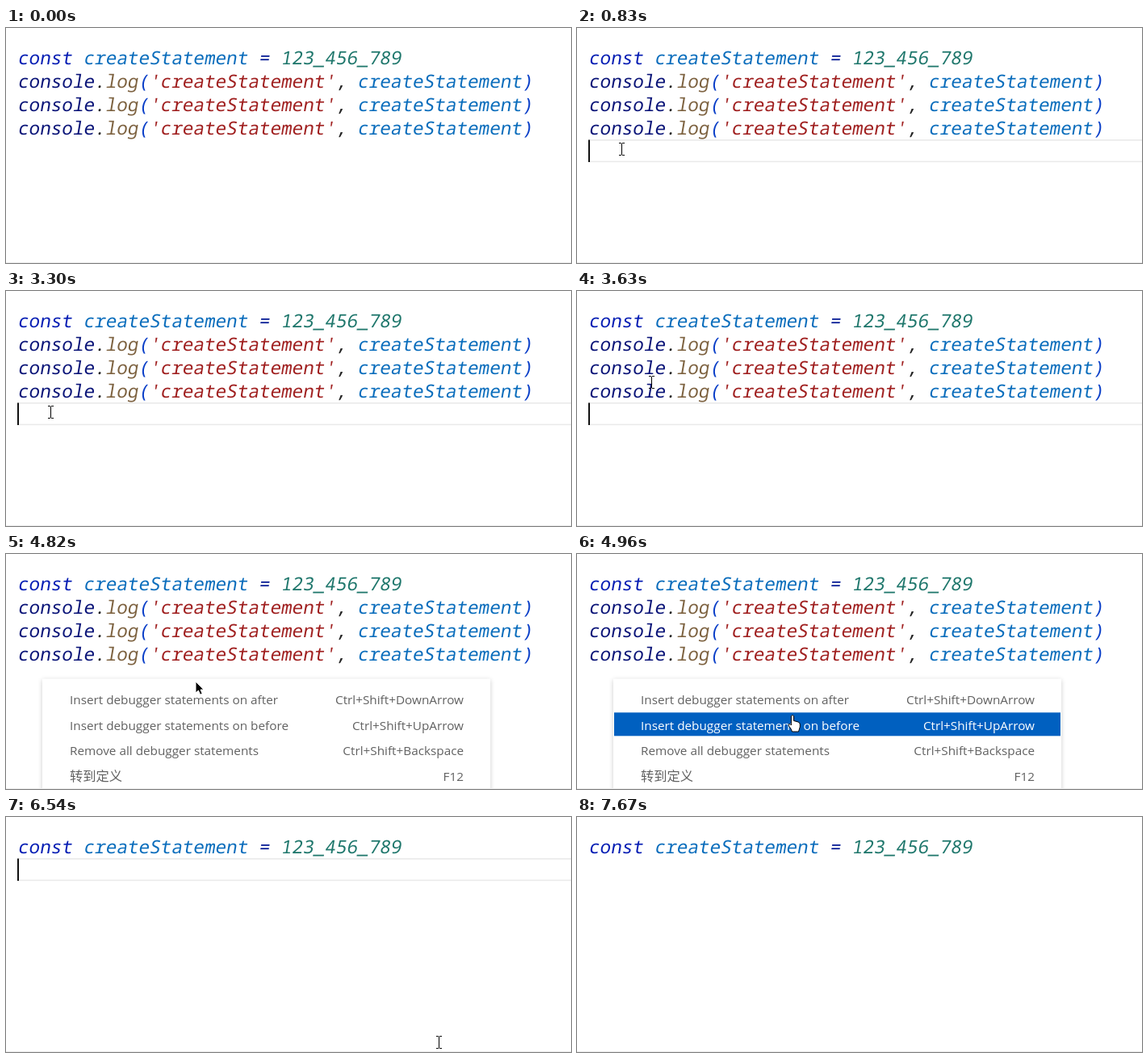
Write an HTML page with a canvas that moves like this. It is 700 px wide and 291 px high and loops after 7740 ms.

```html
<!DOCTYPE html>
<html lang="en">
<head>
<meta charset="utf-8">
<title>Debugger statements</title>
<style>
  html, body { margin: 0; width: 100%; height: 100%; overflow: hidden; background: #fff; }
  canvas { display: block; }
</style>
</head>
<body>
<canvas id="stage" width="700" height="291"></canvas>
<script>
const ctx = document.getElementById('stage').getContext('2d');
const W = 700, H = 291, LOOP = 7740, STEP = 70;
const LINE = 28.8, FIRST_BASELINE = 45.4, FIRST_TOP = 22.6, LEFT = 14;
const CODE_FONT = '300 22.65px "Noto Sans Mono", monospace';
const MENU_FONT = '15.3px "Open Sans", sans-serif';
const CJK_FONT = '16.25px "Noto Sans CJK SC", "Noto Sans CJK", sans-serif';

const DECLARATION = [
  ['const ', '#061eb4'], ['createStatement ', '#0a6dbc'],
  ['= ', '#0a1e96'], ['123_456_789', '#1f776c'],
];
const LOG = [
  ['console', '#0a1478'], ['.', '#222'], ['log', '#7d6240'], ['(', '#0a3fc8'],
  ["'createStatement'", '#a02020'], [', ', '#222'],
  ['createStatement', '#0a6dbc'], [')', '#0a3fc8'],
];
const MENU = [
  ['Insert debugger statements on after', 'Ctrl+Shift+DownArrow'],
  ['Insert debugger statements on before', 'Ctrl+Shift+UpArrow'],
  ['Remove all debugger statements', 'Ctrl+Shift+Backspace'],
  ['转到定义', 'F12', CJK_FONT],
];
const ROW_TOP = 164.7, ROW_PITCH = 31.6, ROW_HEIGHT = 29;

// Pointer route: time, x, y
const ROUTE = [
  [70, 246, 184], [140, 186, 160], [210, 105, 141], [280, 54, 137],
  [480, 54, 137], [620, 55, 150], [3350, 55, 150], [3630, 92, 113],
  [3770, 92, 113], [4050, 50, 138], [4120, 45, 152], [4400, 45, 152],
  [4820, 235, 158], [4890, 250, 180], [4960, 267, 200],
  [5380, 279, 237], [6260, 279, 237], [6680, 664, 300],
];
const CLICKS = [[620, 760], [4120, 4260], [6130, 6260]];
// The recording restarts its 70 ms rhythm at these moments
const ANCHORS = [0, 480, 1760, 3300, 3350, 6130, 6190, 7670];

const ARROW = new Path2D('M0 0V14L3.4 11 5.6 16.2 8.2 15 6 10H10Z');
const HAND = new Path2D('M-1.6 .6Q0 -1.6 1.6 .6V6.5L7 8Q9.3 8.6 9.3 11V14L7.5 20H-.5Q-1.6 16 -4.6 13Q-5.4 9.8 -3.2 10.4L-1.6 12Z');

const within = (t, [from, to]) => t >= from && t < to;

function snap(t) {
  const start = ANCHORS.filter(a => a <= t).pop();
  return start + Math.floor((t - start) / STEP) * STEP;
}

function pointerAt(t) {
  const i = ROUTE.findIndex(p => p[0] > t);
  if (i < 1) return null;
  const [a, b] = [ROUTE[i - 1], ROUTE[i]];
  const k = (t - a[0]) / (b[0] - a[0]);
  return { x: Math.round(a[1] + (b[1] - a[1]) * k), y: Math.round(a[2] + (b[2] - a[2]) * k) };
}

function rect(x, y, w, h, color) {
  ctx.fillStyle = color;
  ctx.fillRect(x, y, w, h);
}

function codeLine(tokens, row) {
  ctx.save();
  ctx.transform(1, 0, -0.17, 1, LEFT, Math.round(FIRST_BASELINE + row * LINE));
  ctx.font = CODE_FONT;
  let x = 0;
  for (const [text, color] of tokens) {
    ctx.fillStyle = color;
    ctx.fillText(text, x, 0);
    x += ctx.measureText(text).width;
  }
  ctx.restore();
}

function currentLine(row) {
  const top = Math.round(FIRST_TOP + row * LINE);
  rect(LEFT, top, W, 1.6, '#eaeaea');
  rect(LEFT, top + 26.6, W, 1.6, '#eaeaea');
  rect(LEFT, top + 0.5, 2, 27.5, '#111');
}

function contextMenu(hovered) {
  ctx.save();
  ctx.beginPath();
  ctx.rect(0, 0, W, 290);
  ctx.clip();
  ctx.shadowColor = 'rgba(0,0,0,.2)';
  ctx.shadowBlur = 6;
  ctx.shadowOffsetY = 1;
  rect(45, 154.5, 555, 200, '#fff');
  ctx.shadowColor = 'transparent';
  MENU.forEach(([label, keys, font], i) => {
    const top = ROW_TOP + i * ROW_PITCH;
    const active = i === hovered;
    if (active) rect(46, top, 553, ROW_HEIGHT, '#0060c0');
    ctx.fillStyle = active ? '#fff' : '#616161';
    ctx.font = font || MENU_FONT;
    ctx.fillText(label, 79, top + 21.4);
    ctx.font = MENU_FONT;
    ctx.textAlign = 'right';
    ctx.fillText(keys, 567, top + 21.4);
    ctx.textAlign = 'left';
  });
  ctx.restore();
}

function textCursor() {
  rect(0, -7, 1, 14, '#000');
  for (const y of [-8, 7]) {
    rect(-3, y, 3, 1, '#000');
    rect(1, y, 3, 1, '#000');
  }
}

function outlined(path, fill, stroke) {
  ctx.lineWidth = 1;
  ctx.lineJoin = 'round';
  ctx.fillStyle = fill;
  ctx.strokeStyle = stroke;
  ctx.fill(path);
  ctx.stroke(path);
}

function drawPointer({ x, y }, clicked, menuOpen, hovered) {
  ctx.save();
  ctx.translate(x, y);
  if (clicked) {
    ctx.fillStyle = 'rgba(220,230,0,.6)';
    ctx.beginPath();
    ctx.arc(0, 0, 12, 0, Math.PI * 2);
    ctx.fill();
  }
  if (!menuOpen) textCursor();
  else if (hovered >= 0) outlined(HAND, '#fff', '#000');
  else outlined(ARROW, '#000', '#fff');
  ctx.restore();
}

function draw(now) {
  const t = snap(now % LOOP);
  const logs = t < 1760 || within(t, [3300, 6330]);
  const focused = within(t, [690, 4190]) || within(t, [6330, 7670]);
  const menuOpen = within(t, [4190, 6260]);
  const pointer = pointerAt(t);
  const hovered = menuOpen ? Math.floor((pointer.y - ROW_TOP) / ROW_PITCH) : -1;

  rect(0, 0, W, H, '#fff');
  if (focused) currentLine(logs ? 4 : 1);
  codeLine(DECLARATION, 0);
  if (logs) for (let row = 1; row <= 3; row++) codeLine(LOG, row);
  if (menuOpen) contextMenu(hovered);
  rect(0, 290, W, 1, '#eee');
  if (pointer) drawPointer(pointer, CLICKS.some(c => within(t, c)), menuOpen, hovered);
}

let begin;
function tick(now) {
  begin ??= now;
  draw(now - begin);
  requestAnimationFrame(tick);
}
requestAnimationFrame(tick);
</script>
</body>
</html>
```
